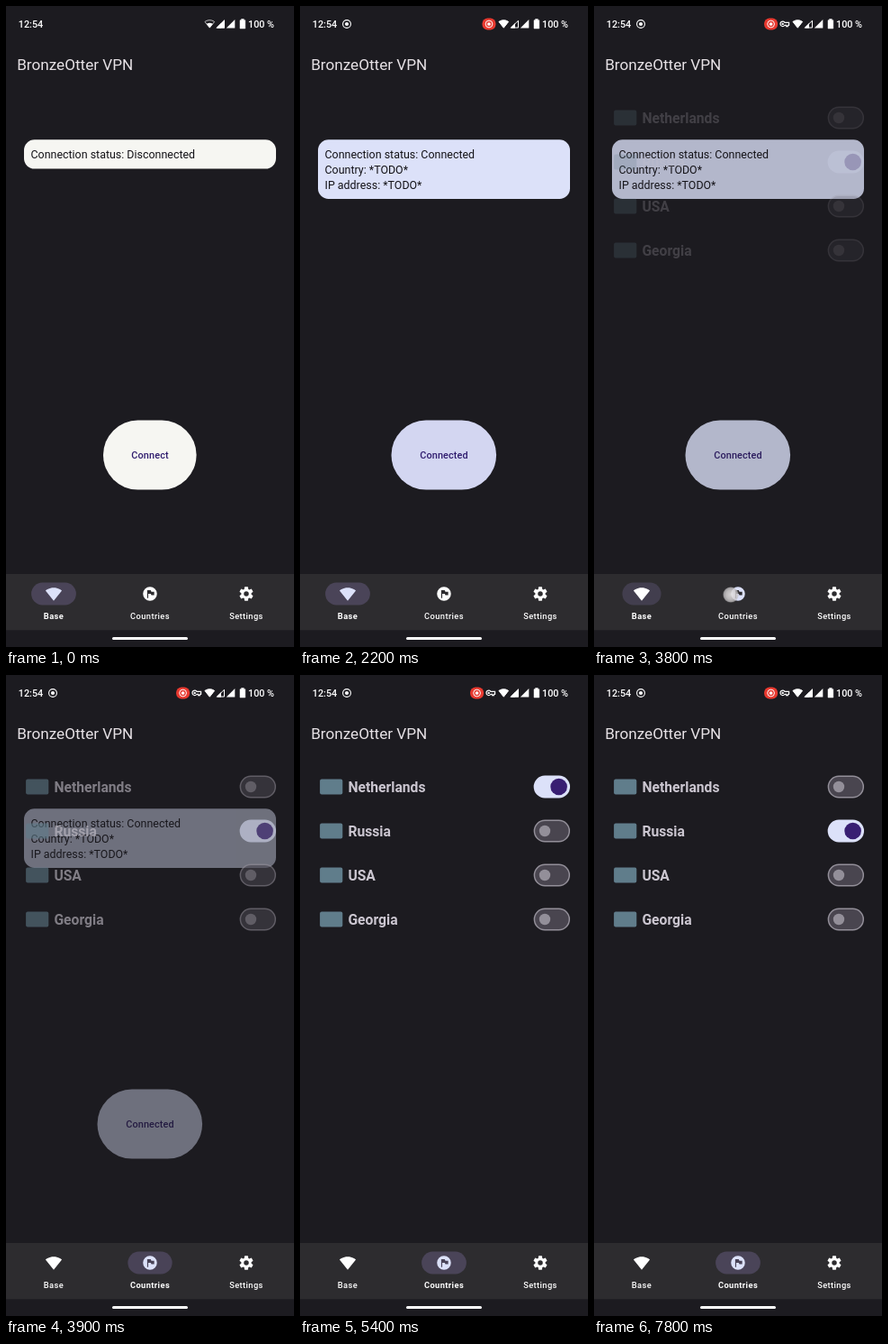
Animation of 320x711 px, one loop 8 s. Source, as an HTML page:

```html
<!DOCTYPE html>
<html lang="en">
<head>
<meta charset="utf-8">
<title>VPN app</title>
<style>
  html, body { margin: 0; width: 100%; height: 100%; overflow: hidden; background: #1c1b20; }
  svg { display: block; width: 100vw; height: 100vh; font-family: Roboto, "Noto Sans", sans-serif; }
  .status { font-size: 10.8px; font-weight: 500; fill: #fff; }
  .title { font-size: 17.15px; fill: #e6e1e5; }
  .body { font-size: 12.45px; fill: #141318; }
  .action { font-size: 10.9px; font-weight: 500; letter-spacing: .12px; fill: #2f1c6e; text-anchor: middle; }
  .row { font-size: 15.7px; font-weight: 700; fill: #cbc6d0; }
  .label { font-size: 9.33px; letter-spacing: .39px; fill: #fff; text-anchor: middle; }
</style>
</head>
<body>
<svg viewBox="0 0 320 711">
  <defs>
    <radialGradient id="glow">
      <stop offset="0" stop-color="#e6e4e4" stop-opacity=".9"/>
      <stop offset=".6" stop-color="#d4d1d2" stop-opacity=".85"/>
      <stop offset=".88" stop-color="#c4c1c3" stop-opacity=".75"/>
      <stop offset="1" stop-color="#aaa" stop-opacity=".3"/>
    </radialGradient>
    <clipPath id="inside"><rect id="clip" y="459.6" height="77" rx="38.5"/></clipPath>
    <path id="wifi" d="M0 9.5 11.64-5C11.2-5.34 6.7-9 0-9S-11.2-5.34-11.64-5Z"/>
    <g id="target">
      <circle r="4.4" fill="none" stroke="#fff" stroke-width="1.1"/>
      <circle r="2.1" fill="#fff"/>
    </g>
  </defs>
  <rect width="320" height="711" fill="#1c1b20"/>

  <!-- status bar -->
  <text class="status" x="13.8" y="24">12:54</text>
  <text class="status" x="269" y="24">100 %</text>
  <use id="rec" href="#target" x="52" y="20"/>
  <g id="chip">
    <rect x="-7.5" y="-6.5" width="15" height="13" rx="6" fill="#e8392f"/>
    <use href="#target" transform="scale(.88)"/>
  </g>
  <g id="key" fill="none" stroke="#fff" stroke-width="1.2">
    <path d="M212 18.4h4.6v2.9h-1.2v1.4h-1.8v-1.4H212a2.7 2.7 0 1 1 0-2.9Z"/>
    <circle cx="209.7" cy="19.9" r=".6"/>
  </g>
  <g fill="#fff">
    <g transform="translate(226.3 19.8) scale(.49)">
      <use href="#wifi" transform="translate(0 3.5) scale(.6)"/>
      <use id="wifiFull" href="#wifi"/>
      <use href="#wifi" fill="none" stroke="#fff" stroke-width="1.6" transform="scale(.93)"/>
    </g>
    <path id="signalFull" d="M233.5 24.5h9.5V15Z"/>
    <path d="M234.7 24h7.8v-7.8Z" fill="none" stroke="#fff"/>
    <path d="M233.5 24.5h5.5V19Z"/>
    <path d="M244.8 24.5h9.5V15Z"/>
    <path d="M261.5 14.5h2.8v1.2h1.5v9.3h-5.8v-9.3h1.5Z" stroke="#fff" stroke-width=".5" stroke-linejoin="round"/>
  </g>

  <text class="title" x="12.2" y="71">BronzeOtter VPN</text>

  <g id="base">
    <rect id="card" x="20" y="148.2" width="280" rx="11.7"/>
    <text class="body" x="27.5" y="169.3" id="state"></text>
    <g id="details">
      <text class="body" x="27.5" y="186.3">Country: *TODO*</text>
      <text class="body" x="27.5" y="203.3">IP address: *TODO*</text>
    </g>
    <rect id="button" y="459.6" height="77" rx="38.5"/>
    <g clip-path="url(#inside)"><circle id="ripple" cx="160" cy="498" fill="#381e72"/></g>
    <text class="action" x="160" y="502.4" id="action"></text>
  </g>
  <g id="countries"></g>

  <rect y="630" width="320" height="62.3" fill="#2d2c2f"/>
  <g id="nav"></g>
  <rect x="118" y="700" width="84" height="3" rx="1.5" fill="#fff"/>
  <circle id="touch" r="8.8" fill="url(#glow)"/>
</svg>
<script>
const $ = id => document.getElementById(id);
const set = (el, attrs) => { for (const k in attrs) el.setAttribute(k, attrs[k]); };
const show = (el, v) => el.setAttribute('opacity', +v);
const mix = (a, b, k) => `color-mix(in srgb, ${b} ${k * 100}%, ${a})`;
const LILAC = '#dce1f9';

// Fast-out-slow-in, cubic-bezier(.4, 0, .2, 1), solved by bisection
function ease(x) {
  let lo = 0, hi = 1;
  for (let i = 0; i < 20; i++) {
    const s = (lo + hi) / 2, r = 1 - s;
    if (1.2 * s * r * r + .6 * s * s * r + s ** 3 < x) lo = s; else hi = s;
  }
  return lo * lo * (3 - 2 * lo);
}
function ramp(t, start, length) {
  const x = (t - start) / length;
  return x <= 0 ? 0 : x >= 1 ? 1 : ease(x);
}

$('countries').innerHTML = ['Netherlands', 'Russia', 'USA', 'Georgia'].map((name, i) => `
  <g transform="translate(0 ${124 + 49 * i})">
    <rect x="22.1" y="-8.6" width="25.2" height="17.1" rx="2" fill="#607d8b"/>
    <text class="row" x="53.4" y="5.7">${name}</text>
    <rect class="track" x="260.4" y="-11.7" width="38.9" height="23.4" rx="11.7" stroke-width="1.5"/>
    <circle class="halo" r="15.5" fill="#e6e1e5"/>
    <circle class="thumb"/>
  </g>`).join('');
const switches = [...$('countries').children].map(g => ({
  track: g.querySelector('.track'), halo: g.querySelector('.halo'), thumb: g.querySelector('.thumb')
}));

const teeth = [0, 60, 120].map(a => `<rect x="-2.1" y="-7.7" width="4.2" height="15.4" rx=".8" transform="rotate(${a})"/>`).join('');
const icons = [
  '<use href="#wifi" transform="translate(0 .3) scale(.778)"/>',
  '<path transform="scale(.778) translate(-12 -12)" fill-rule="evenodd" d="M12 2a10 10 0 1 0 0 20a10 10 0 0 0 0-20ZM18 14h-4l-1-2H9.5v6H8V7h5l1 2h4Z"/>',
  `${teeth}<circle r="5.7"/><circle r="2.75" fill="#2d2c2f"/>`
];
$('nav').innerHTML = ['Base', 'Countries', 'Settings'].map((name, i) => `
  <g transform="translate(${53 + 107 * i} 652)">
    <rect class="pill" y="-12.4" height="24.9" rx="12.4" fill="#4a4458"/>
    <g class="icon">${icons[i]}</g>
    <text class="label" y="28">${name}</text>
  </g>`).join('');
const tabs = [...$('nav').children].map(g => ({
  pill: g.querySelector('.pill'), icon: g.querySelector('.icon'), label: g.querySelector('.label')
}));

// Taps: start, end, x, y
const taps = [[2000, 2100, 172, 507], [3700, 3900, 152, 653], [4800, 4900, 290, 134], [7000, 7100, 288, 177]];

function drawStatus(t) {
  const live = ramp(t, 0, 300);
  const vpn = ramp(t, 2200, 300);
  const weakWifi = t < 300 || t >= 6900 && t < 7800;
  show($('rec'), live);
  show($('chip'), live);
  set($('chip'), { transform: `translate(${210 - 13.4 * vpn} 20)` });
  show($('key'), vpn);
  show($('wifiFull'), !weakWifi);
  show($('signalFull'), t < 1700 || t >= 4300);
}

function drawBase(t) {
  const on = t >= 2200;
  const width = on ? 116.6 : 103.6;
  const box = { x: 159.8 - width / 2, width };
  set($('card'), { height: on ? 65.8 : 32.4 });
  set($('button'), box);
  set($('clip'), box);
  $('card').style.fill = $('button').style.fill = on ? LILAC : '#f6f6f2';
  $('state').textContent = 'Connection status: ' + (on ? 'Connected' : 'Disconnected');
  $('action').textContent = on ? 'Connected' : 'Connect';
  show($('details'), on);
  set($('ripple'), { r: 20 + 50 * ramp(t, 1950, 225) });
  show($('ripple'), t >= 2000 ? .1 * (1 - ramp(t, 2150, 150)) : 0);
}

function drawSwitch(s, k, press, halo) {
  const r = 6.2 + 3.1 * k;
  s.track.style.fill = mix('#49454f', LILAC, k);
  s.track.style.stroke = mix('#938f99', LILAC, k);
  s.thumb.style.fill = mix('#938f99', '#381e72', k);
  const cx = 272 + 15.6 * k;
  set(s.thumb, { cx, r: r + (10.6 - r) * press });
  set(s.halo, { cx });
  show(s.halo, halo);
}

function drawCountries(t) {
  const first = ramp(t, 4880, 120) - ramp(t, 7080, 120);
  const pulse = start => ramp(t, start, 100) * (1 - ramp(t, start + 150, 150));
  [first, 1 - first, 0, 0].forEach((k, i) => {
    const press = i < 2 ? pulse([4800, 7000][i]) : 0;
    drawSwitch(switches[i], k, press, .1 * press);
  });
}

function drawTabs(t) {
  const moved = ramp(t, 3770, 150);
  const tint = ramp(t, 3690, 100);
  [[1 - moved, 1 - tint], [moved, tint], [0, 0]].forEach(([k, colour], i) => {
    const { pill, icon, label } = tabs[i];
    const width = 49.8 * k;
    set(pill, { x: -width / 2, width });
    show(pill, k * k);
    icon.style.fill = mix('#fff', LILAC, colour);
    label.style.fontWeight = k > .5 ? 700 : 500;
  });
}

function frame(now) {
  const t = Math.floor(now / 100) * 100 % 8000;
  drawStatus(t);
  drawBase(t);
  drawCountries(t);
  drawTabs(t);
  const fade = ramp(t, 3633, 700);
  show($('base'), 1 - fade);
  show($('countries'), fade);
  const tap = taps.find(([a, b]) => t >= a && t < b);
  show($('touch'), !!tap);
  if (tap) set($('touch'), { cx: tap[2], cy: tap[3] });
  requestAnimationFrame(frame);
}
frame(performance.now());
</script>
</body>
</html>
```
